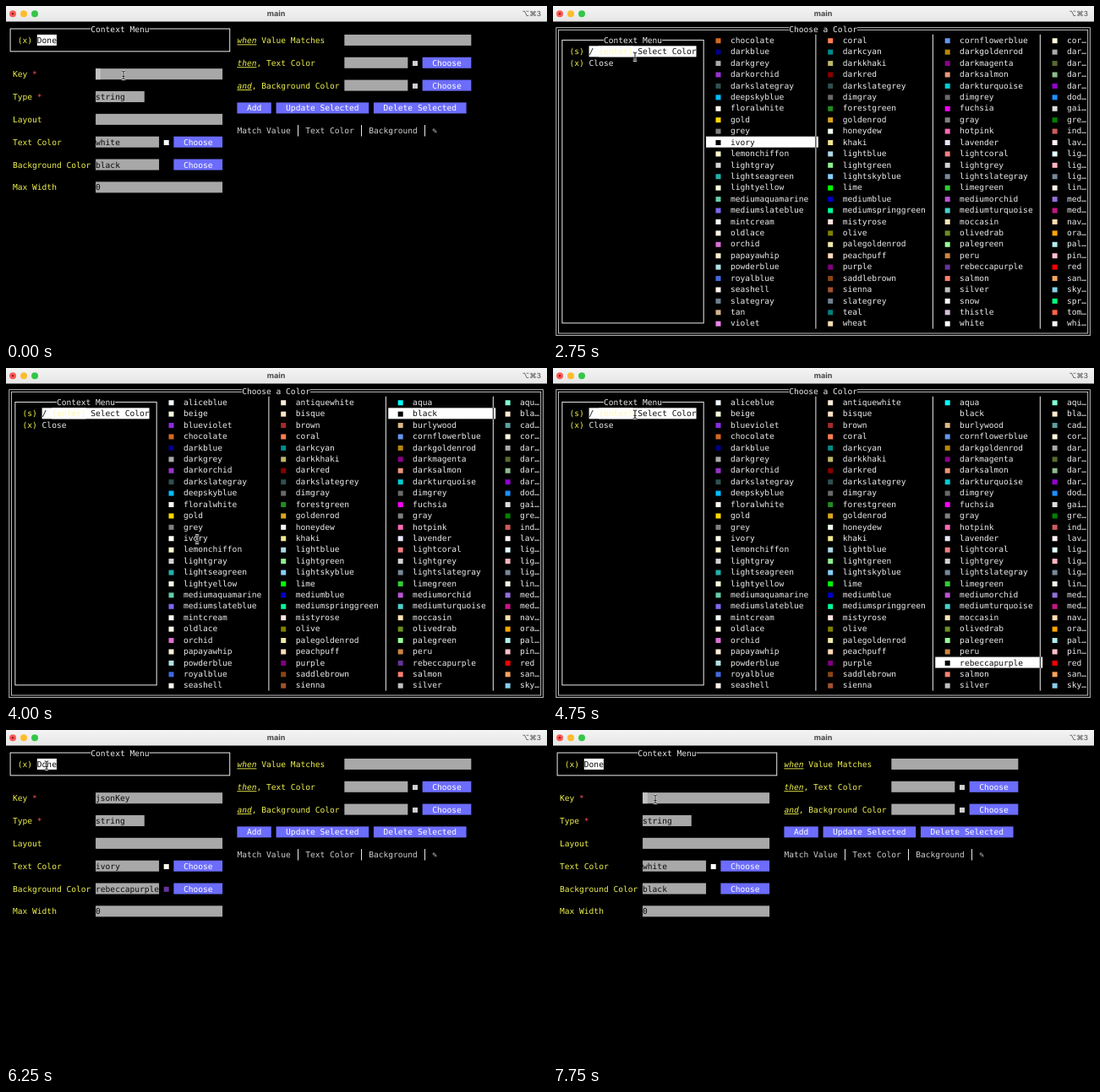
Animation, 640 px wide and 396 px high, one loop 8000 ms. Source, as an HTML page with a canvas:

```html
<!DOCTYPE html>
<html lang="en">
<head>
<meta charset="utf-8">
<title>main</title>
<style>
  html, body { margin: 0; width: 100%; height: 100%; overflow: hidden; background: #000; }
  canvas { display: block; width: 640px; height: 396px; }
</style>
</head>
<body>
<canvas id="stage"></canvas>
<script>
const LOOP = 8000, STEP = 250;
const W = 5.77, H = 13.42, X0 = 2.2, Y0 = 27;
const MONO = '"DejaVu Sans Mono", monospace';
const WHITE = '#ececec', BRIGHT = '#fff', YELLOW = '#eef04e', RED = '#f2505c';
const FIELD = '#a8a8a8', CARET = '#c2c2c2', BUTTON = '#6c6cfd', INK = '#0c0c0c';

const canvas = document.getElementById('stage');
const ctx = canvas.getContext('2d');
const dpr = window.devicePixelRatio || 1;
canvas.width = 640 * dpr;
canvas.height = 396 * dpr;
ctx.scale(dpr, dpr);
ctx.textRendering = 'geometricPrecision';

// Terminal grid helpers: columns and rows map to stage pixels
const left = c => X0 + c * W;
const midX = c => left(c) + W / 2;
const midY = r => Y0 + r * H;

function fill(c, r, n, color) {
  ctx.fillStyle = color;
  ctx.fillRect(left(c), midY(r) - H / 2 + 0.2, n * W, H - 0.4);
}

function text(c, r, str, color = WHITE, style = '') {
  ctx.font = `${style} 9.58px ${MONO}`;
  ctx.fillStyle = color;
  [...str].forEach((ch, i) => {
    if (ch !== ' ') ctx.fillText(ch, left(c + i), midY(r) + 3.5);
  });
}

function mark(c, r, str, color = INK) {
  fill(c, r, str.length, BRIGHT);
  text(c, r, str, color);
}

function swatch(c, r, color) {
  ctx.fillStyle = color;
  ctx.fillRect(midX(c) - 3, midY(r) - 2.2, 6, 6);
}

function bar(c, r, color = WHITE, rows = 1) {
  ctx.fillStyle = color;
  ctx.fillRect(midX(c) - 0.5, midY(r) - H / 2, 1, rows * H);
}

function box(c1, r1, c2, r2, title, titleCol, double) {
  ctx.strokeStyle = WHITE;
  ctx.lineWidth = double ? 0.8 : 1;
  for (const d of double ? [-1.3, 1.3] : [0]) {
    const x = midX(c1) - d, y = midY(r1) - d;
    ctx.strokeRect(x, y, midX(c2) + d - x, midY(r2) + d - y);
  }
  fill(titleCol, r1, title.length, '#000');
  text(titleCol, r1, title);
}

function field(c, r, n, value = '') {
  fill(c, r, n, FIELD);
  text(c, r, value, INK);
}

function button(c, r, label) {
  fill(c, r, label.length + 4, BUTTON);
  text(c + 2, r, label, BRIGHT);
}

function titleBar() {
  const g = ctx.createLinearGradient(0, 0, 0, 18);
  g.addColorStop(0, '#f4f4f4');
  g.addColorStop(1, '#e6e6e6');
  ctx.fillStyle = g;
  ctx.fillRect(0, 0, 640, 18.5);
  ['#fc5b57', '#fdbc2e', '#35c649'].forEach((color, i) => disc(8 + i * 13, 9.2, 4, color));
  disc(8, 9.2, 1.2, '#8c1a15');
  ctx.fillStyle = '#444';
  ctx.font = 'bold 9px Inter, sans-serif';
  ctx.textAlign = 'center';
  ctx.fillText('main', 319.5, 12.2);
  ctx.font = '8.5px Inter, "DejaVu Sans", sans-serif';
  ctx.textAlign = 'right';
  ctx.fillText('⌥⌘3', 633, 12.2);
  ctx.textAlign = 'left';
}

function disc(x, y, r, color) {
  ctx.fillStyle = color;
  ctx.beginPath();
  ctx.arc(x, y, r, 0, Math.PI * 2);
  ctx.fill();
}

function form({ key = '', color = 'white', back = 'black', caret = true }) {
  box(0, 0, 45, 2, 'Context Menu', 17);
  text(2, 1, '(x)', YELLOW);
  mark(6, 1, 'Done');

  ['Key', 'Type', 'Layout', 'Text Color', 'Background Color', 'Max Width']
    .forEach((label, i) => text(1, 4 + i * 2, label, YELLOW));
  text(5, 4, '*', RED);
  text(6, 6, '*', RED);
  field(18, 4, 26, key);
  if (caret) fill(18 + key.length, 4, 1, CARET);
  field(18, 6, 10, 'string');
  field(18, 8, 26);
  [color, back].forEach((name, i) => {
    const r = 10 + i * 2;
    field(18, r, 13, name);
    swatch(32, r, name);
    button(34, r, 'Choose');
  });
  field(18, 14, 26, '0');

  [['when', ' Value Matches'], ['then', ', Text Color'], ['and', ', Background Color']]
    .forEach(([word, rest], i) => {
      const r = 1 + i * 2;
      text(47, r, word, YELLOW, 'italic');
      ctx.fillRect(left(47), midY(r) + 5, word.length * W, 0.9);
      text(47 + word.length, r, rest, YELLOW);
      field(69, r, i ? 13 : 26);
      if (i) {
        swatch(83, r, '#d0d0d0');
        button(85, r, 'Choose');
      }
    });
  button(47, 7, 'Add');
  button(55, 7, 'Update Selected');
  button(75, 7, 'Delete Selected');
  text(47, 9, 'Match Value   Text Color   Background   ✎', '#cfcfcf');
  [59, 72, 85].forEach(c => bar(c, 9));
}

// Five colors per line; the fifth column lies outside the window
const COLORS = `aliceblue antiquewhite aqua aquamarine azure
beige bisque black blanchedalmond blue
blueviolet brown burlywood cadetblue chartreuse
chocolate coral cornflowerblue cornsilk crimson
darkblue darkcyan darkgoldenrod darkgray darkgreen
darkgrey darkkhaki darkmagenta darkolivegreen darkorange
darkorchid darkred darksalmon darkseagreen darkslateblue
darkslategray darkslategrey darkturquoise darkviolet deeppink
deepskyblue dimgray dimgrey dodgerblue firebrick
floralwhite forestgreen fuchsia gainsboro ghostwhite
gold goldenrod gray green greenyellow
grey honeydew hotpink indianred indigo
ivory khaki lavender lavenderblush lawngreen
lemonchiffon lightblue lightcoral lightcyan lightgoldenrodyellow
lightgray lightgreen lightgrey lightpink lightsalmon
lightseagreen lightskyblue lightslategray lightslategrey lightsteelblue
lightyellow lime limegreen linen maroon
mediumaquamarine mediumblue mediumorchid mediumpurple mediumseagreen
mediumslateblue mediumspringgreen mediumturquoise mediumvioletred midnightblue
mintcream mistyrose moccasin navajowhite navy
oldlace olive olivedrab orange orangered
orchid palegoldenrod palegreen paleturquoise palevioletred
papayawhip peachpuff peru pink plum
powderblue purple rebeccapurple red rosybrown
royalblue saddlebrown salmon sandybrown seagreen
seashell sienna silver skyblue slateblue
slategray slategrey snow springgreen steelblue
tan teal thistle tomato turquoise
violet wheat white whitesmoke yellow`.split('\n').map(line => line.split(' '));
const LIST_COLS = [31, 54, 78, 100];
const SWATCH_COLS = [33, 56, 80, 102];

function picker({ picked, scroll }) {
  box(0, 0, 109, 27, 'Choose a Color', 48, true);
  box(1, 1, 30, 26, 'Context Menu', 10);
  text(3, 2, '(s)', YELLOW);
  mark(7, 2, '/ (enter) Select Color');
  fill(9, 2, 7, BRIGHT);
  text(9, 2, '(enter)', '#fff6b0');
  text(3, 3, '(x)', YELLOW);
  text(7, 3, 'Close');

  [53, 77, 99].forEach(c => bar(c, 1, WHITE, 26));
  COLORS.slice(scroll, scroll + 26).forEach((line, i) => {
    const r = i + 1;
    line.slice(0, 4).forEach((name, k) => {
      const on = name === picked;
      if (on) {
        fill(LIST_COLS[k], r, LIST_COLS[k + 1] - LIST_COLS[k], BRIGHT);
        bar([53, 77, 99][k], r, INK);
      }
      const label = k === 3 && name.length > 3 ? name.slice(0, 3) + '…' : name;
      swatch(SWATCH_COLS[k], r, on ? '#000' : name);
      text(SWATCH_COLS[k] + 3, r, label, on ? INK : WHITE);
    });
  });
}

function table() {
  box(0, 0, 29, 27, 'Context Menu', 9);
  ['Add New', 'Edit', 'Move Up', 'Move Down', 'Remove', 'Save', 'Quit'].forEach((label, i) => {
    text(2, i + 1, `(${'aeudrsq'[i]})`, YELLOW);
    (i ? text : mark)(6, i + 1, label);
  });
  fill(30, 1, 78, BRIGHT);
  [[33, 'Key'], [42, 'Type'], [50, 'Layout'], [59, 'Text Color'], [77, 'Background'], [95, 'Color Match']]
    .forEach(([c, label]) => text(c, 0, label, YELLOW));
  [[31, 'jsonKey'], [41, 'string'], [65, 'ivory'], [79, 'rebeccapurple']]
    .forEach(([c, label]) => text(c, 1, label, INK));
  [39, 48, 57, 71, 93].forEach(c => bar(c, 0));
  [39, 48, 57, 63, 71, 77, 93].forEach(c => bar(c, 1, '#333'));
  swatch(60, 1, '#000');
  swatch(74, 1, '#000');
}

// Pointer waypoints: step, x, y
const PATH = [
  [0, 139, 82], [4, 141, 84], [6, 145, 130], [7, 149, 163], [8, 226, 161], [10, 226, 161],
  [11, 97, 60], [12, 97, 56], [14, 226, 188], [15, 226, 190], [16, 226, 203], [18, 508, 349],
  [19, 97, 55], [20, 93, 50], [23, 60, 44], [25, 48, 42], [27, 44, 51], [28, 48, 42],
  [29, 52, 43], [31, 121, 82]
];

function pointer(step) {
  const i = Math.max(1, PATH.findIndex(p => p[0] >= step));
  const [s1, x1, y1] = PATH[i - 1], [s2, x2, y2] = PATH[i];
  const k = (step - s1) / (s2 - s1);
  const x = x1 + (x2 - x1) * k, y = y1 + (y2 - y1) * k;
  for (const [color, width] of [['#e4e4e4', 2.6], ['#222', 1]]) {
    ctx.strokeStyle = color;
    ctx.lineWidth = width;
    ctx.beginPath();
    ctx.moveTo(x - 2.2, y - 5);
    ctx.quadraticCurveTo(x, y - 5, x, y - 3.5);
    ctx.quadraticCurveTo(x, y - 5, x + 2.2, y - 5);
    ctx.moveTo(x, y - 3.5);
    ctx.lineTo(x, y + 3.5);
    ctx.moveTo(x - 2.2, y + 5);
    ctx.quadraticCurveTo(x, y + 5, x, y + 3.5);
    ctx.quadraticCurveTo(x, y + 5, x + 2.2, y + 5);
    ctx.moveTo(x - 1.5, y + 1.5);
    ctx.lineTo(x + 1.5, y + 1.5);
    ctx.stroke();
  }
}

function screen(step) {
  const key = 'jsonKey';
  if (step < 9) {
    const typed = Math.min(7, Math.max(0, Math.round((step - 1) * 1.4)));
    form({ key: key.slice(0, typed) });
  }
  else if (step < 12) picker({ picked: step < 10 ? 'white' : 'ivory', scroll: 3 });
  else if (step < 15) form({ key, color: 'ivory', caret: false });
  else if (step < 20) picker({ picked: step < 18 ? 'black' : 'rebeccapurple', scroll: 0 });
  else if (step < 26) form({ key, color: 'ivory', back: 'rebeccapurple', caret: false });
  else if (step < 29) table();
  else form({});
}

let shown = -1;
function tick() {
  const step = Math.floor(performance.now() % LOOP / STEP);
  if (step !== shown) {
    shown = step;
    ctx.fillStyle = '#000';
    ctx.fillRect(0, 0, 640, 396);
    titleBar();
    screen(step);
    pointer(step);
  }
  requestAnimationFrame(tick);
}
tick();
</script>
</body>
</html>
```
